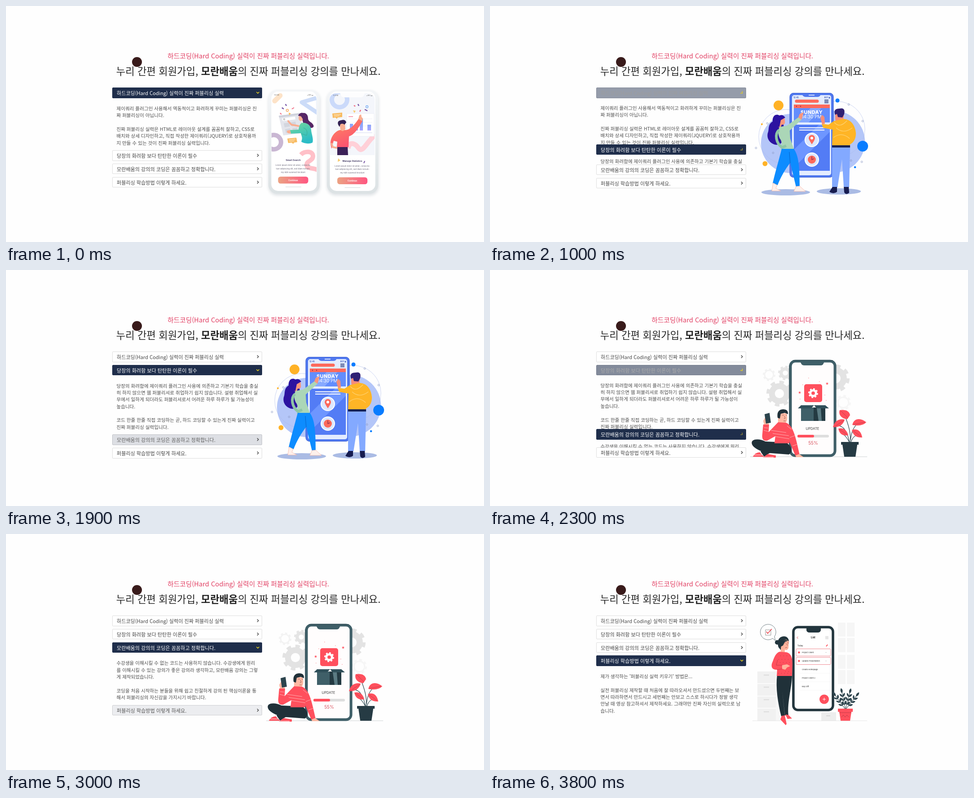
An HTML page that plays this animation: 1062 px wide and 527 px high, repeating every 4800 ms.

```html
<!DOCTYPE html>
<html lang="ko">
<head>
<meta charset="utf-8">
<title>Accordion</title>
<style>
html, body { margin: 0; width: 100%; height: 100%; overflow: hidden; background: #fefefe; }
body { position: relative; font-family: 'Noto Sans CJK KR', 'Noto Sans KR', 'Noto Sans CJK JP', 'Noto Sans CJK', sans-serif; font-weight: 300; }
#art { position: absolute; left: 0; top: 0; }
.head { position: absolute; left: 236px; width: 332.5px; height: 23.5px; box-sizing: border-box; border: 1px solid; border-radius: 2px; padding-left: 9px; font-size: 11.08px; line-height: 22px; white-space: nowrap; }
.head svg { position: absolute; right: 3px; top: 5px; }
.panel { position: absolute; left: 236px; width: 332px; overflow: hidden; }
.panel div { position: absolute; left: 9.5px; font-size: 10.55px; line-height: 15.38px; color: #4c4c4c; white-space: pre; }
.tiny { font-family: Inter, 'Open Sans', sans-serif; font-weight: 400; }
</style>
</head>
<body>
<svg id="art" width="1062" height="527" viewBox="0 0 1062 527">
  <defs>
    <linearGradient id="btn"><stop stop-color="#eba383"/><stop offset="1" stop-color="#ff5681"/></linearGradient>
    <linearGradient id="teal" x2="0.4" y2="1"><stop stop-color="#72d89b"/><stop offset="1" stop-color="#2cbcc6"/></linearGradient>
    <linearGradient id="coral" x2="0.5" y2="1"><stop stop-color="#ff8d5e"/><stop offset="1" stop-color="#fb4f72"/></linearGradient>
    <linearGradient id="case" x2="0" y2="1"><stop stop-color="#f4f6f8"/><stop offset="1" stop-color="#dce2e4"/></linearGradient>
    <linearGradient id="bar" x2="0" y2="1"><stop stop-color="#6da6f5"/><stop offset="1" stop-color="#a9a5ff"/></linearGradient>
    <filter id="soft" x="-20%" y="-20%" width="140%" height="140%"><feGaussianBlur stdDeviation="3"/></filter>
    <clipPath id="left"><rect x="590" y="195" width="100" height="218" rx="14"/></clipPath>
    <clipPath id="right"><rect x="719" y="195" width="100" height="218" rx="14"/></clipPath>
  </defs>

  <g text-anchor="middle">
    <text x="538.5" y="117" font-size="14.65" fill="#e23f63">하드코딩(Hard Coding) 실력이 진짜 퍼블리싱 실력입니다.</text>
    <text x="538.5" y="153.5" font-size="22.23" font-weight="400" fill="#282828">누리 간편 회원가입, <tspan font-weight="700" fill="#222">모란배움</tspan>의 진짜 퍼블리싱 강의를 만나세요.</text>
  </g>
  <circle cx="291" cy="125" r="11" fill="#391b1b"/>

  <g class="scene">
    <g id="cases"></g>
    <g clip-path="url(#left)" fill="none">
      <path d="M597 212L609 200" stroke="#fde3c8" stroke-width="11" stroke-linecap="round"/>
      <path d="M657 215L694 204V240Z" stroke="#ccdcf8" stroke-width="9" stroke-linejoin="round"/>
      <circle cx="595" cy="304" r="16" stroke="#c9b7d3" stroke-width="10"/>
      <path d="M655 332C663 323 683 323 682 336C681 347 668 345 668 355C669 365 682 360 694 367" stroke="#ffc0c8" stroke-width="10"/>
    </g>
    <path d="M606 245L652 239L664 283L616 289Z" fill="#e3e5ec"/>
    <path d="M606 245L652 239L653 243L607 249Z" fill="#cfd2dc"/>
    <path d="M613 251L642 247L643 253L615 257Z" fill="#fff"/>
    <path d="M617 262L629 260L631 269L619 271ZM633 260L643 258L645 267L635 269ZM620 275L631 273L633 282L622 284ZM636 273L647 271L649 280L638 282Z" fill="#d3d6df"/>
    <circle cx="618" cy="253" r="1.6" fill="none" stroke="#777" stroke-width=".7"/>
    <path d="M650 268L634 265L627 257" fill="none" stroke="#f9ae91" stroke-width="4" stroke-linecap="round" stroke-linejoin="round"/>
    <path d="M655 241C664 235 671 242 671 250C671 259 679 258 683 266C686 273 675 274 671 270L661 264Z" fill="#572765"/>
    <ellipse cx="655" cy="250" rx="5" ry="7" fill="#f9ae91"/>
    <path d="M649 245C653 236 663 237 668 245L660 253C657 250 657 246 654 246Z" fill="#572765"/>
    <path d="M657 261C668 259 677 266 678 276C678 284 684 297 681 305C673 309 662 307 656 303C660 293 656 290 655 284L633 285L631 277L650 276C651 270 652 264 657 261Z" fill="url(#teal)"/>
    <path d="M631 277L633 285L626 284Q622 279 626 278Z" fill="#f9ae91"/>
    <path d="M661 272Q672 276 668 289L656 285" fill="none" stroke="#38a88e" stroke-width=".8"/>
    <path d="M625 296L645 294L647 304L640 305L638 308L635 305L627 306Z" fill="#f8bb61"/>
    <path d="M628 299L643 297M629 302L641 301" stroke="#fff" stroke-width=".8"/>
    <path d="M621 219L623 223M613 227L617 230" stroke="#7552a4" stroke-width="2.4"/>
    <path d="M635 230L640 227M609 239L612 242" stroke="#f06b83" stroke-width="2"/>
    <path d="M628 238L633 240L629 244Z" fill="#f9bd55"/>
    <circle cx="625" cy="233" r="2.5" fill="none" stroke="#f6ac66" stroke-width="1.4"/>

    <g clip-path="url(#right)">
      <path d="M719 195H820V333H719Z" fill="#f4f6fb"/>
      <circle cx="741" cy="209" r="17" fill="none" stroke="#cbdafa" stroke-width="10"/>
      <path d="M760 318C763 300 777 308 783 317C793 330 801 303 820 288" fill="none" stroke="#ffd0d8" stroke-width="11"/>
      <path d="M742 194H797Q795 204 788 204H751Q744 204 742 194Z" fill="#fdfdfe"/>
    </g>
    <path d="M757 240H818V291H757Z" fill="#fff" stroke="#e6e9f2" stroke-width=".7"/>
    <path d="M761 247H771" stroke="#f16d86" stroke-width="1.3"/>
    <path d="M761 252H814M761 260H814M761 268H814" stroke="#e8eaf1" stroke-width=".7"/>
    <path d="M764 263H771V278H764ZM776 268H782V278H776ZM786 252H793V278H786ZM803 265H811V278H803Z" fill="url(#bar)"/>
    <path d="M761 283H814" stroke="#d5daf0" stroke-width="1.2"/>
    <path d="M725 240L747 238V248L737 249L735 252L732 249L726 250Z" fill="#f8bb61"/>
    <path d="M728 243L744 242M729 246L741 245" stroke="#fff" stroke-width=".8"/>
    <path d="M736 314H759L760 333H736Z" fill="#3b2158"/>
    <path d="M754 277C766 276 776 263 784 251L792 257C784 271 774 288 762 291L761 315H735L736 303L728 301L723 319L721 308C720 294 731 279 742 277Z" fill="url(#coral)"/>
    <path d="M783 252L785 244L789 242L790 248L793 251L791 257Z" fill="#f9ae91"/>
    <path d="M741 261H753L754 275Q747 283 743 276Z" fill="#f9ae91"/>
    <path d="M738 265Q735 256 745 255Q754 252 756 260L752 265Q748 261 743 264L741 270Z" fill="#322052"/>
    <path d="M723 306L726 315L736 317" fill="none" stroke="#f9ae91" stroke-width="4"/>
    <path d="M782 219L784 223M797 231L803 234" stroke="#7552a4" stroke-width="2.4"/>
    <path d="M773 222L776 224M786 236L788 232" stroke="#f06b83" stroke-width="2.4"/>
    <path d="M771 233L777 234L774 239ZM738 340L743 345L737 348Z" fill="#f7cb70"/>
    <circle cx="802" cy="225" r="2.5" fill="none" stroke="#79aef3" stroke-width="1.3"/>
    <path d="M797 346L795 351" stroke="#7552a4" stroke-width="2"/>
    <g id="captions" class="tiny" text-anchor="middle"></g>
  </g>

  <g class="scene">
    <g fill="#b4c6f8"><circle cx="668" cy="307" r="66"/><circle cx="764" cy="303" r="69"/></g>
    <circle cx="658" cy="292" r="61" fill="none" stroke="#a9b9ea" stroke-width=".6"/>
    <circle cx="771" cy="275" r="62" fill="none" stroke="#a9b9ea" stroke-width=".6"/>
    <g fill="#ffb226"><circle cx="641" cy="222" r="11"/><circle cx="604" cy="264" r="2"/><circle cx="611" cy="352" r="5.5"/></g>
    <g fill="#087cff"><circle cx="772" cy="211" r="4.5"/><circle cx="828" cy="313" r="12"/><circle cx="811" cy="360" r="2.3"/></g>
    <g id="rings" fill="none" stroke="#8998c4" stroke-width=".8"></g>
    <g fill="#aabbe4"><ellipse cx="657" cy="416" rx="54" ry="7"/><ellipse cx="775" cy="414" rx="49" ry="7"/></g>
    <rect x="666" y="194.500" width="97" height="188" rx="8" fill="#5078ef" stroke="#365dd2"/>
    <rect x="671" y="199" width="87" height="179" rx="5" fill="#e3ecff"/>
    <path d="M693 196H735Q734 203 728 203H701Q695 203 693 196Z" fill="#5078ef"/>
    <path d="M708 199H721" stroke="#fff" stroke-width="1.5"/>
    <path d="M681 212.500H727" stroke="#fc6a5c" stroke-width="7" stroke-linecap="round"/>
    <path d="M743 210H752M743 213H752M743 216H752" stroke="#1b2d73" stroke-width="1.5"/>
    <path d="M675 220H755V260H675Z" fill="#638dfd"/>
    <path d="M675 220H755V228H675Z" fill="#fc6a5c"/>
    <path d="M712 228H736L708 260H684Z" fill="#86a9ff"/>
    <circle cx="681" cy="224" r="1.2" fill="#9d2e50"/><circle cx="690" cy="224" r="1.2" fill="#9d2e50"/>
    <path d="M675 265H755V368H675Z" fill="#537cf5"/>
    <path d="M731 265H755V281L675 361V321Z" fill="#6e96ff"/>
    <path d="M687 272H743M687 277H743" stroke="#fff" stroke-width="1.8"/>
    <g fill="#dce7ff" stroke="#fff" stroke-width="2"><circle cx="715" cy="299" r="15"/><circle cx="715" cy="343" r="15"/></g>
    <path d="M715 309C709 299 708 297 708 295A7 7 0 0 1 722 295C722 298 719 303 715 309Z" fill="#fc6a5c"/>
    <circle cx="715" cy="295" r="3" fill="#fff"/>
    <circle cx="715" cy="343" r="9" fill="#fc6a5c"/>
    <path d="M715 336V343L720 341" fill="none" stroke="#7d284f" stroke-width="1.2"/>
    <g class="tiny" text-anchor="middle" fill="#fff">
      <text x="714.500" y="241" font-size="10.800" font-weight="800" letter-spacing=".5">SUNDAY</text>
      <text x="714.500" y="250.500" font-size="10">14:30 PM</text>
      <text x="680" y="206" font-size="4.500" font-weight="600" fill="#2c4bb0">12:45</text>
      <text x="749" y="206" font-size="4.500" font-weight="600" fill="#2c4bb0">80%▮</text>
    </g>

    <path d="M640 243C631 241 627 250 628 258C616 265 621 276 617 284C614 298 624 309 637 310C653 310 652 292 650 282C656 272 651 247 640 243Z" fill="#2c13a0"/>
    <path d="M643 248Q656 244 655 256Q657 266 648 265L645 274L638 267Z" fill="#fa967d"/>
    <path d="M639 247Q649 239 656 249L646 255L643 270L636 269Z" fill="#2c13a0"/>
    <path d="M644 270L660 267L686 248L692 254L666 278L667 296L675 319L646 322C648 312 649 306 646 299C639 290 639 275 644 270Z" fill="#abd6b7"/>
    <path d="M685 249L688 241L697 237L692 254Z" fill="#fa967d"/>
    <path d="M642 277C632 286 635 306 649 316L658 312" fill="none" stroke="#8ec5a6" stroke-width="6"/>
    <path d="M648 319H675C686 334 688 360 688 403L680 404L667 350C655 366 646 382 639 400L628 396C636 362 643 340 648 319Z" fill="#0d8cff"/>
    <path d="M665 326L667 351" stroke="#0562c9"/>
    <path d="M629 395L638 400L635 407L646 413H626ZM680 403L688 402L701 414H675Z" fill="#fff0eb" stroke="#f6b6a6" stroke-width=".8"/>

    <path d="M767 252V237Q769 228 781 230Q788 235 786 247L784 258H768Z" fill="#f58d78"/>
    <path d="M767 243Q761 229 777 229Q790 226 787 241L783 249L773 248L771 241Z" fill="#302073"/>
    <path d="M764 257L785 252C801 253 811 264 813 284Q813 302 800 309V314H760L761 276L740 272L737 263L752 265Z" fill="#ffb526"/>
    <path d="M765 260Q777 274 793 256M769 272Q785 287 805 272M763 294Q781 280 799 296" fill="none" stroke="#ffd170" stroke-width="1.2"/>
    <path d="M738 264L734 250L738 243L743 248L744 263Z" fill="#f58d78"/>
    <path d="M760 311H800V316H760Z" fill="#182252"/>
    <path d="M760 316H800L798 405H786L782 342L772 405H760Z" fill="#83a9ff"/>
    <path d="M761 404H771V415Q763 421 754 415ZM786 404H797L798 417Q791 423 787 416Z" fill="#171c50"/>
  </g>

  <g class="scene">
    <g id="gears"></g>
    <path d="M578 417H838" stroke="#bfc6c8" stroke-width=".8"/>
    <rect x="667.500" y="203.500" width="99" height="211" rx="11" fill="#fffdfd" stroke="#3f5f68" stroke-width="6"/>
    <path d="M665 411V213M673 202H762" stroke="#2c474f" stroke-width="1" fill="none"/>
    <path d="M689 203H743Q741 213 735 213H698Q691 213 689 203Z" fill="#3f5f68"/>
    <rect x="698" y="255" width="40" height="40" rx="5" fill="#ff505d"/>
    <g id="cog"></g>
    <g id="stars" fill="#ff505d"></g>
    <path d="M691 307H719V337H691Z" fill="#3f5f68"/><path d="M719 307H745V337H719Z" fill="#243a42"/>
    <path d="M691 302L684 309H713L720 302ZM720 302L726 309H753L745 302Z" fill="#31505a"/>
    <path d="M726 309L730 337H737L735 309Z" fill="#5b7b83"/>
    <path d="M686 371H750" stroke="#dedede" stroke-width="6" stroke-linecap="round"/>
    <path d="M686 371H717" stroke="#ff505d" stroke-width="6" stroke-linecap="round"/>
    <g class="tiny" text-anchor="middle"><text x="716.500" y="357" font-size="7.600" fill="#3a3a3a">UPDATE</text><text x="718" y="390" font-size="10" fill="#d95561">55%</text></g>

    <path d="M612 383C599 376 578 376 582 389C585 397 598 403 611 408L664 412C674 406 670 393 658 385Z" fill="#203139"/>
    <path d="M661 386C643 388 625 397 605 411" fill="none" stroke="#203139" stroke-width="14"/>
    <path d="M599 407L609 417H584Q588 408 599 407ZM617 411L635 414V419H606Z" fill="#ff505d"/>
    <path d="M606 413H585M630 418H607" stroke="#fff" stroke-width="1.2"/>
    <path d="M640 320H659Q664 338 653 344L651 351L640 345Z" fill="#ffb9a3"/>
    <path d="M639 330Q636 312 651 311Q663 311 662 322L655 319L646 321L644 332Z" fill="#203139"/>
    <path d="M649 324H653M657 324H660M654 326L656 331L653 332M652 337H657" fill="none" stroke="#7d4d4a" stroke-width=".8"/>
    <path d="M640 340L658 341C674 348 679 372 688 413L679 416L665 383V387H632L634 371L616 381Q603 383 605 367L607 345L620 345L619 362Z" fill="#ff505d"/>
    <path d="M609 352L618 353M608 358L619 361M624 358L658 363M628 365L664 370M634 372L665 377M660 348L670 356M666 374L677 370M672 393L683 389" stroke="#ffacaf" stroke-width="1"/>
    <path d="M609 345L607 337L612 328L621 336L619 345ZM679 414L687 411L697 418H680Z" fill="#ffb9a3"/>
    <path d="M610 322L621 319L624 341L613 343Z" fill="#2c444d"/>

    <g fill="none" stroke="#39535c" stroke-width="1.3"><path d="M800 386C803 366 796 344 787 322M799 386C794 361 786 348 772 347M801 380Q804 349 821 341M802 384Q806 371 818 367M799 386Q792 371 783 366"/></g>
    <g fill="#ff505d"><path d="M794 333C778 332 774 320 777 313Q797 310 800 324Z"/><path d="M762 351C765 337 776 331 788 334Q783 352 762 351Z"/><path d="M805 346C808 331 823 329 836 340Q827 350 805 346Z"/><path d="M774 354Q791 351 796 369Q777 372 774 354Z"/><path d="M804 357Q823 352 827 374Q807 375 804 357Z"/></g>
    <path d="M779 314L795 330M765 350L786 336M807 345L833 340M776 356L793 367M807 359L824 372" stroke="#b73643" stroke-width=".7"/>
    <path d="M780 384H819V390H780ZM783 390H816L812 417H787Z" fill="#263b44"/>
  </g>

  <g class="scene">
    <path d="M594 307H635V417H594Z" fill="#f1f1f1"/>
    <path d="M635 307H645V417H635Z" fill="#f7f7f7"/>
    <path d="M594 334H635M594 362H635M594 389H635" stroke="#fff" stroke-width="1.5"/>
    <path d="M608 315H620M608 342H620M608 370H620M608 397H620" stroke="#dedede" stroke-width="2.500"/>
    <path d="M773 198H790V229H773ZM793 198H810V229H793ZM773 232H790V264H773ZM793 232H810V264H793ZM773 270H790V301H773ZM793 270H810V301H793ZM773 304H790V335H773ZM793 304H810V335H793Z" fill="#f6f6f6"/>
    <path d="M736 398H769V417H736Z" fill="#ededed"/><path d="M747 406H756" stroke="#d6d6d6" stroke-width="2"/>
    <path d="M583 417H838" stroke="#ddd" stroke-width=".8"/>
    <path d="M628 233L634 238L632 229A17.300 17.300 0 1 0 628 233Z" fill="#fff" stroke="#52646b" stroke-width=".8"/>
    <path d="M612 214H624V226H612Z" fill="none" stroke="#777" stroke-width=".8"/>
    <path d="M614 218L617 222L626 212" fill="none" stroke="#e8464e" stroke-width="1.6"/>

    <rect x="674" y="208" width="88" height="185" rx="10" fill="#fff" stroke="#22353d" stroke-width="5.500"/>
    <path d="M703 208H735V215Q734 220 728 220H710Q704 220 703 215Z" fill="#22353d"/>
    <path d="M684.500 229L682 231.500L684.500 234" fill="none" stroke="#d94b56" stroke-width="1"/>
    <path d="M745 229H752M745 231.500H752M745 234H752" stroke="#aaa" stroke-width=".7"/>
    <path d="M747 251L750 247" stroke="#ff505d" stroke-width="2"/>
    <g fill="#fff" stroke="#f08b93" stroke-width="1"><rect x="680" y="256.500" width="77" height="16" rx="2"/><rect x="680" y="275.500" width="77" height="16" rx="2"/></g>
    <g fill="#ff505d"><circle cx="686.500" cy="264.500" r="2.200"/><circle cx="686.500" cy="283.500" r="2.200"/><circle cx="742.500" cy="369" r="10.500"/></g>
    <path d="M739 369H746M742.500 365.500V372.500" stroke="#fff" stroke-width="1"/>
    <path d="M745 264.500H748M745 283.500H748" stroke="#aaa" stroke-width=".6"/>
    <path d="M688 311H757M688 330H757M688 349H757" stroke="#f4f4f4" stroke-width=".7"/>
    <g id="todo" class="tiny" fill="#444"></g>

    <circle cx="638" cy="242" r="5" fill="#22353d"/>
    <path d="M641 253C634 232 650 225 659 230C667 236 664 246 661 250L650 264Z" fill="#22353d"/>
    <path d="M650 239Q660 233 664 240L663 255Q660 261 655 258V267H645L647 249Z" fill="#ffb39c"/>
    <path d="M645 252Q645 233 663 238L655 241L651 249Z" fill="#22353d"/>
    <path d="M654 243H657M660 243H663M659 245L661 249M656 254L660 253" stroke="#8c4946" stroke-width=".8" fill="none"/>
    <path d="M638 314H671C671 343 660 374 663 405H655L649 348L655 407H647C640 378 634 344 638 314Z" fill="#203139"/>
    <path d="M643 263L658 264C670 266 672 279 672 290L671 317H637L638 303C624 304 624 293 628 285C632 274 635 266 643 263Z" fill="#ff505d"/>
    <path d="M639 281L636 293L650 293V301L637 303" fill="none" stroke="#bd3643" stroke-width=".8"/>
    <path d="M649 293L660 291L667 295L660 298L656 303L649 301Z" fill="#ffb39c"/>
    <path d="M645 272H669M641 280H670M644 287H670M656 307H670M640 311H670" stroke="#a92e3b" stroke-width="1" stroke-dasharray="1 6"/>
    <path d="M648 406L655 405L659 424L657 427L645 414ZM656 403L663 404L671 412L661 413Z" fill="#ff505d"/>
    <g id="leaves" fill="#2d444d"></g>
    <path d="M773 390H806V397H773ZM776 397H803L800 417H779Z" fill="#ff505d"/>
    <path d="M776 399H803M781 409L785 404L789 409L793 404L797 409" fill="none" stroke="#c43c49" stroke-width="1"/>
  </g>
</svg>

<script>
const items = [
  ['하드코딩(Hard Coding) 실력이 진짜 퍼블리싱 실력',
   '제이쿼리 플러그인 사용해서 역동적이고 화려하게 꾸미는 퍼블리싱은 진\n짜 퍼블리싱이 아닙니다.\n\n진짜 퍼블리싱 실력은 HTML로 레이아웃 설계를 꼼꼼히 잘하고, CSS로\n배치와 상세 디자인하고, 직접 작성한 제이쿼리(JQUERY)로 상호작용까\n지 만들 수 있는 것이 진짜 퍼블리싱 실력입니다.'],
  ['당장의 화려함 보다 탄탄한 이론이 필수',
   '당장의 화려함에 제이쿼리 플러그인 사용에 의존하고 기본기 학습을 충실\n히 하지 않으면 웹 퍼블리셔로 취업하기 쉽지 않습니다. 설령 취업해서 실\n무에서 일하게 되더라도 퍼블리셔로서 어려운 하루 하루가 될 가능성이\n높습니다.\n\n코드 한줄 한줄 직접 코딩하는 곧, 하드 코딩할 수 있는게 진짜 실력이고\n진짜 퍼블리싱 실력입니다.'],
  ['모란배움의 강의의 코딩은 꼼꼼하고 정확합니다.',
   '수강생을 이해시킬 수 없는 코드는 사용하지 않습니다. 수강생에게 원리\n를 이해시킬 수 있는 강의가 좋은 강의라 생각하고, 모란배움 강의는 그렇\n게 제작되었습니다.\n\n코딩을 처음 시작하는 분들을 위해 쉽고 친절하게 강의 된 핵심이론을 통\n해서 퍼블리싱의 자신감을 가지시기 바랍니다.'],
  ['퍼블리싱 학습방법 이렇게 하세요.',
   "제가 생각하는 '퍼블리싱 실력 키우기' 방법은...\n\n실전 퍼블리싱 제작할 때 처음에 잘 따라오셔서 만드셨으면 두번째는 보\n면서 따라하면서 만드시고 세번째는 안보고 스스로 하시다가 정말 생각\n안날 때 영상 참고하셔서 제작하세요. 그래야만 진짜 자신의 실력으로 남\n습니다."]
];
const hover = [-1000, 554, 1860, 2972], click = [-1000, 908, 2220, 3335, 9999];
const LOOP = 4800, STEP = 100, SLIDE = 400, FADE = 300;
const TOP = 182.2, HEAD = 23.5, GAP = 6.15, PAD = 9.1, LINE = 15.38;
const white = [255, 255, 255], navy = [31, 46, 75], ink = [68, 68, 68], edge = [221, 221, 221], yellow = [248, 222, 30];

const $ = id => document.getElementById(id);
const fill = (id, list, make) => { $(id).innerHTML = list.map(make).join(''); };
const text = (x, y, size, str, more = '') => `<text x="${x}" y="${y}" font-size="${size}" ${more}>${str}</text>`;

// Illustration parts that repeat
fill('cases', [583, 713], x => `<rect x="${x}" y="190" width="115" height="233" rx="20" fill="#dfe3e6" filter="url(#soft)"/>
  <rect x="${x}" y="187" width="114" height="232" rx="20" fill="url(#case)"/>
  <rect x="${x + 6.5}" y="191" width="101" height="222" rx="15" fill="#fff"/>`);
fill('captions', [[638, 0, 'Smart Search'], [769.5, 1.5, 'Manage Statistics']], ([x, d, name]) =>
  text(x, 346 + d, 5, name, 'font-weight="700" fill="#473f68"') +
  ['Lorem ipsum dolor sit amet, consecte-', 'tuer adipiscing elit, sed diam nonum-', 'my nibh euismod tincidunt']
    .map((s, i) => text(x, 357 + d + i * 7.9, 4.35, s, 'fill="#666477"')).join('') +
  `<rect x="${x - 33.5}" y="${381 + d}" width="67" height="15.5" rx="5.5" fill="url(#btn)"/>` +
  text(x, 390.5 + d, 4.8, 'Continue', 'font-weight="700" fill="#fff"') +
  `<path d="M${x - 17} ${404 + d}h35" stroke="#d2d7da" stroke-width="1.2"/>` +
  text(x - 37, 199.5 + d, 2.8, '11:41 AM', 'fill="#555"') + text(x + 38, 199.5 + d, 3, '▴ 89% ▬', 'fill="#555"'));
fill('rings', [[616, 262], [591, 317], [629, 328], [797, 220], [802, 345], [826, 348], [828, 257]],
  ([x, y]) => `<circle cx="${x}" cy="${y}" r="1.9"/>`);
const gear = ([x, y, r, c, hole]) => `<g fill="none" stroke="${c}">
  <circle cx="${x}" cy="${y}" r="${r * (.8 + hole) / 2}" stroke-width="${r * (.8 - hole)}"/>
  <circle cx="${x}" cy="${y}" r="${r * .88}" stroke-width="${r * .24}" pathLength="80" stroke-dasharray="5 5"/></g>`;
fill('gears', [[643, 276, 29, '#e3e3e3', .35], [620, 234, 14, '#f3f3f3', .6], [656, 230, 16, '#e5e5e5', .35],
  [768, 242, 31, '#e3e3e3', .35], [785, 296, 17, '#f6f6f6', .6]], gear);
fill('cog', [[718, 275, 11, '#fff', .35]], gear);
fill('stars', [[688, 273, 7], [749, 253, 7], [708, 241, 3], [695, 256, 3], [732, 249, 3], [744, 279, 3], [689, 288, 3], [747, 291, 3]],
  ([x, y, s]) => text(x, y + s * .36, s, s > 5 ? '★' : '●', 'text-anchor="middle" font-family="DejaVu Sans, sans-serif"'));
fill('todo', [[713, 233.3, 5.6, 'List'], [683, 250.5, 4.3, 'Today'], [693, 266, 4.1, 'Project Client'], [693, 285, 4.1, 'Update Presentation'],
  [693, 304, 4.1, 'Create Homepage'], [693, 323, 4.1, 'Project Client 2'], [693, 342, 4.1, 'Buy Gift']],
  ([x, y, s, str], i) => text(x, y, s, str, i ? 'font-weight="500"' : 'font-weight="700" fill="#222"'));
fill('leaves', [-36, -12, 14, 38], a => `<g transform="rotate(${a} 790 392)"><path d="M789.500 391V352H790.500V391Z"/>` +
  [0, 9, 18].map(d => `<path d="M790 ${363 + d}q-6 -1 -6 -8q5 1 6 8q0 -7 6 -8q0 7 -6 8"/>`).join('') +
  '<path d="M790 355q-5 -6 0 -12q5 6 0 12"/></g>');

// Accordion
const rows = items.map(([title, body]) => {
  const panel = document.createElement('div'), head = document.createElement('div'), copy = document.createElement('div');
  panel.className = 'panel';
  head.className = 'head';
  copy.textContent = body;
  panel.append(copy);
  head.textContent = title;
  head.insertAdjacentHTML('beforeend', '<svg width="11" height="11" viewBox="-5.5 -5.5 11 11" fill="none" stroke-width="1.4"><path d="M-1.500 -3L1.500 0L-1.500 3"/></svg>');
  document.body.append(panel, head);
  return { panel, head, copy, arrow: head.querySelector('path'), full: body.split('\n').length * LINE + PAD * 2 };
});
const scenes = document.querySelectorAll('.scene');

const clamp = p => Math.min(1, Math.max(0, p));
const swing = p => .5 - Math.cos(clamp(p) * Math.PI) / 2;
const mix = (a, b, p) => `rgb(${a.map((v, i) => Math.round(v + (b[i] - v) * p))})`;

// The CSS "ease" curve
function ease(p) {
  if (p <= 0) return 0;
  if (p >= 1) return 1;
  const curve = (a, b, u) => 3 * a * u * (1 - u) ** 2 + 3 * b * u * u * (1 - u) + u ** 3;
  let lo = 0, hi = 1;
  for (let i = 0; i < 20; i++) {
    const mid = (lo + hi) / 2;
    if (curve(.25, .25, mid) < p) lo = mid; else hi = mid;
  }
  return curve(.1, 1, lo);
}

function draw(t) {
  let y = TOP;
  rows.forEach(({ panel, head, copy, arrow, full }, i) => {
    const since = t - click[i], past = t - click[i + 1];
    const open = swing(since / SLIDE) - swing(past / SLIDE);
    const tint = ease((t - hover[i]) / FADE) - ease(past / FADE);
    const turn = ease(since / FADE) - ease(past / FADE);
    const glow = past < 0 ? ease(since / FADE) : past < SLIDE ? 1 - past / 800 : 0;
    head.style.top = y + 'px';
    head.style.background = mix(white, navy, tint);
    head.style.borderColor = mix(edge, navy, tint);
    head.style.color = mix(ink, white, tint);
    arrow.setAttribute('stroke', mix(ink, yellow, glow));
    arrow.setAttribute('transform', `rotate(${90 * turn})`);
    y += HEAD + GAP;
    panel.style.top = y + 'px';
    panel.style.height = full * open + 'px';
    copy.style.top = PAD * open + 'px';
    y += full * open;
  });
  const shown = click.filter(c => t >= c).length - 1;
  scenes.forEach((s, i) => { s.style.display = i === shown ? '' : 'none'; });
}

const start = performance.now();
function tick() {
  const t = (performance.now() - start) % LOOP;
  draw(Math.floor(t / STEP) * STEP);
  requestAnimationFrame(tick);
}
tick();
</script>
</body>
</html>
```
